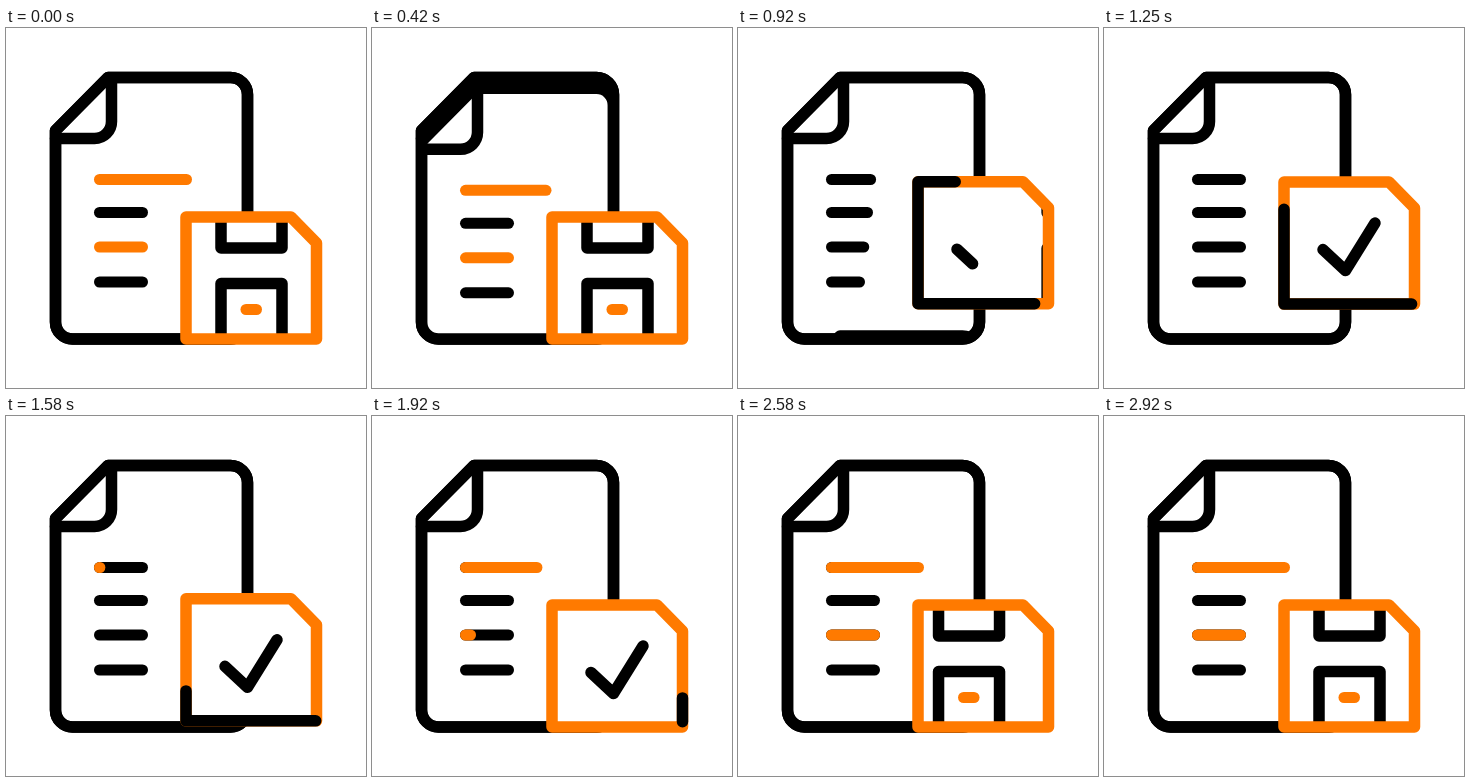
Animation, 360 px wide and 360 px high, one loop 3000 ms. Source, as an HTML page with a canvas:

```html
<!DOCTYPE html>
<html lang="en">
<head>
<meta charset="utf-8">
<title>Save document</title>
<style>
  html, body { margin: 0; width: 100%; height: 100%; overflow: hidden; background: #fff; }
  canvas { display: block; width: 360px; height: 360px; }
</style>
</head>
<body>
<canvas width="360" height="360"></canvas>
<script>
const ctx = document.querySelector('canvas').getContext('2d');
const LOOP = 3000, BLACK = '#000', ORANGE = '#ff7a00';

const sheet = new Path2D('M102 49.5H224.5a17 17 0 0 1 17 17V294a17 17 0 0 1-17 17H66.500a17 17 0 0 1-17-17V102.500Z');
const fold = new Path2D('M105.500 52V93.500a17 17 0 0 1-17 17H49.500');
const disk = new Path2D('M310.500 215L285 189H180V311H310.500Z');
const shutter = new Path2D('M215 189V220H276V189M215 311V255.500H276V311');
const slot = new Path2D('M240 281.500H250.500');
const tick = new Path2D('M219 256.500L241.500 277.500L271 230');
const TICK_LENGTH = 87;

const rows = [
  { y: 151.5, end: 180.5, color: ORANGE, start: 1560 },
  { y: 184.5, end: 136.5, color: BLACK },
  { y: 219, end: 136.5, color: ORANGE, start: 1810 },
  { y: 254, end: 136.5, color: BLACK }
];

// Distances along the disk outline, counter-clockwise from the cut corner
const headKeys = [[460, 16], [580, 53], [920, 380], [1080, 390], [1580, 393], [1920, 423], [2050, 427]];
const tailKeys = [[460, 16], [580, 17], [920, 104], [1580, 233], [1920, 399], [2050, 427]];

function ease(t, from, to) {
  const p = Math.min(1, Math.max(0, (t - from) / (to - from)));
  return (1 - Math.cos(Math.PI * p)) / 2;
}

function track(t, keys) {
  if (t <= keys[0][0]) return keys[0][1];
  for (let i = 1; i < keys.length; i++) {
    const [t0, v0] = keys[i - 1], [t1, v1] = keys[i];
    if (t < t1) return v0 + (v1 - v0) * (t - t0) / (t1 - t0);
  }
  return keys[keys.length - 1][1];
}

function stroke(path, color, width = 11.5) {
  ctx.strokeStyle = color;
  ctx.lineWidth = width;
  ctx.stroke(path);
}

function strokePart(path, color, from, to) {
  if (to - from < 0.1) return;
  ctx.setLineDash([to - from, 1000]);
  ctx.lineDashOffset = -from;
  stroke(path, color);
  ctx.setLineDash([]);
}

function row(y, end, amount, color) {
  if (amount <= 0) return;
  const line = new Path2D();
  line.moveTo(93.5, y);
  line.lineTo(93.5 + (end - 93.5) * amount, y);
  stroke(line, color, 11);
}

function drawPage() {
  ctx.fillStyle = '#fff';
  ctx.fill(sheet);
  stroke(sheet, BLACK);
  stroke(fold, BLACK);
}

function drawDocument(t) {
  drawPage();
  rows.forEach(({ y, end, color, start }, i) => {
    row(y, 136.5, ease(t, 653 + 23 * i, 986 + 23 * i), BLACK);
    if (start) row(y, end, ease(t, start, start + 500), color);
  });

  // The finished page slides down and out
  const slide = 261 * ease(t, 340, 960);
  if (slide < 261) {
    ctx.save();
    ctx.clip(sheet);
    ctx.translate(0, slide);
    drawPage();
    ctx.beginPath();
    ctx.rect(0, 0, 360, 299 - slide);
    ctx.clip();
    rows.forEach(({ y, end, color }, i) =>
      row(y, end, i ? 1 : 1 - ease(t, 333, 833), color));
    ctx.restore();
  }
  stroke(sheet, BLACK);
}

function drawDisk(t) {
  const lift = 41 * (ease(t, 417, 1083) - ease(t, 1083, 1750));
  const shift = t < 1500 ? 110 * ease(t, 430, 1083) : -110 * (1 - ease(t, 2083, 2735));
  ctx.save();
  ctx.translate(0, -lift);
  ctx.fillStyle = '#fff';
  ctx.fill(disk);

  if (Math.abs(shift) < 109) {
    ctx.save();
    ctx.clip(disk);
    ctx.translate(shift, 0);
    stroke(shutter, BLACK);
    stroke(slot, ORANGE, 11);
    ctx.restore();
  }
  strokePart(tick, BLACK, TICK_LENGTH * ease(t, 2050, 2330), TICK_LENGTH * ease(t, 800, 1167));
  stroke(disk, ORANGE);
  strokePart(disk, BLACK, track(t, tailKeys), track(t, headKeys));
  ctx.restore();
}

function frame() {
  const t = performance.now() % LOOP;
  ctx.clearRect(0, 0, 360, 360);
  ctx.lineCap = ctx.lineJoin = 'round';
  drawDocument(t);
  drawDisk(t);
  requestAnimationFrame(frame);
}
frame();
</script>
</body>
</html>
```
